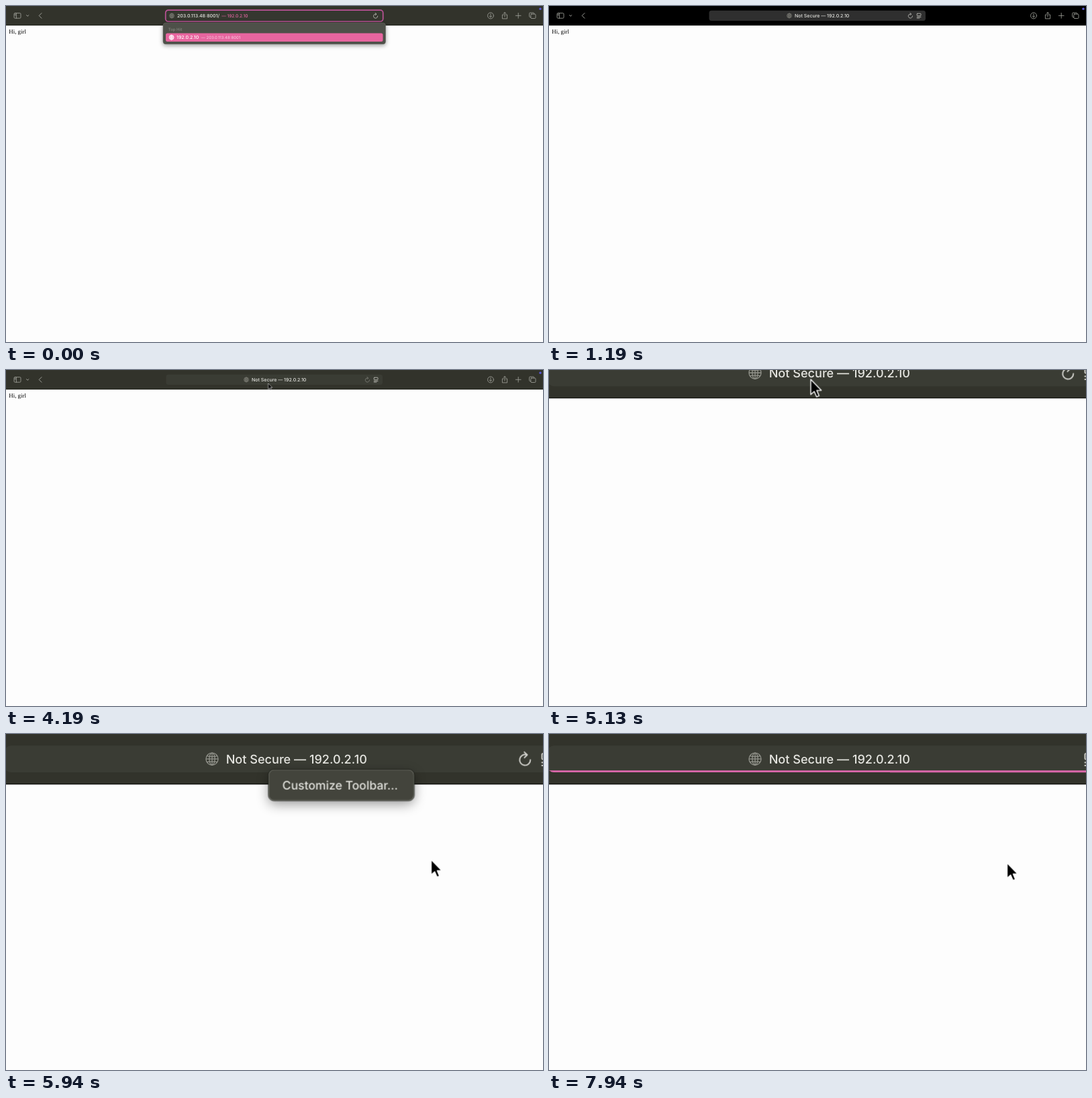
Animation of 800 by 500 pixels, one loop 8000 ms. Source, as an HTML page:

```html
<!DOCTYPE html>
<html lang="en">
<head>
<meta charset="utf-8">
<title>Browser toolbar</title>
<style>
@property --zoom { syntax: "<number>"; inherits: false; initial-value: 1; }
@property --focus { syntax: "<number>"; inherits: false; initial-value: 20.8; }
@property --x { syntax: "<length>"; inherits: false; initial-value: 396px; }
@property --y { syntax: "<length>"; inherits: false; initial-value: 26px; }

html, body { margin: 0; width: 100%; height: 100%; overflow: hidden; background: #fdfdfd; }
svg { display: block; }
text { font: 500 7px Inter, "Open Sans", sans-serif; fill: #e6e6e1; text-rendering: geometricPrecision; white-space: pre; }
.page { font: 8.9px "Liberation Serif", serif; fill: #000; }
.line { fill: none; stroke: #a0a19a; stroke-width: .85; stroke-linecap: round; stroke-linejoin: round; }
.bright { stroke: #d2d2cd; stroke-width: .75; }
.globe { fill: none; stroke: #92938b; stroke-width: .5; }

/* every track shares one 8 s clock */
.cam, .bar, .field, .focus, .list, .loading, .secure, .reader, .reload,
.stop, .share, .load, .menu, .hover, .cursor { animation: 8s linear infinite; }

.cam {
  animation-name: cam;
  transform: translate(calc((1 - var(--zoom)) * 390.2px), calc((1 - var(--zoom)) * var(--focus) * 1px)) scale(var(--zoom));
}
@keyframes cam {
  0%, 54.4% { --zoom: 1; --focus: 20.8; animation-timing-function: ease-in-out; }
  61% { --zoom: 2.584; --focus: 20.8; }
  64.3% { --zoom: 2.584; --focus: 20.8; animation-timing-function: ease-in-out; }
  69%, 100% { --zoom: 2.584; --focus: 0; }
}

.bar { animation-name: bar; }
@keyframes bar {
  0%, 11%, 43.5%, 100% { fill: #32332b; }
  14.1%, 38% { fill: #000; }
}
.field { animation-name: field; }
@keyframes field {
  0%, 11%, 43.5%, 100% { fill: #3a3c34; }
  14.1%, 38% { fill: #2f2f2f; }
}

.focus { animation-name: focus; animation-timing-function: step-end; }
@keyframes focus { 0% { opacity: 1; } 2%, 100% { opacity: 0; } }
.list { animation-name: list; }
@keyframes list { 0%, 1.5% { opacity: 1; } 4%, 100% { opacity: 0; } }

.loading { animation-name: loading; animation-timing-function: step-end; }
@keyframes loading {
  0%, 11%, 44%, 100% { opacity: 0; }
  2%, 25.75% { opacity: 1; }
}
.secure { animation-name: secure; animation-timing-function: step-end; }
@keyframes secure {
  0%, 25.75% { opacity: 0; }
  11%, 44%, 100% { opacity: 1; }
}
.reader { animation-name: reader; animation-timing-function: step-end; }
@keyframes reader { 0% { opacity: 0; } 2%, 100% { opacity: 1; } }
.reload { animation-name: reload; }
@keyframes reload {
  0%, 11%, 25.76%, 50.6%, 80.51%, 100% { opacity: 0; }
  13.5%, 25.75%, 54.2%, 80.5% { opacity: 1; }
}
.stop { animation-name: stop; animation-timing-function: step-end; }
@keyframes stop {
  0%, 10.2%, 44%, 98.4%, 100% { opacity: 0; }
  2%, 25.75%, 81.5% { opacity: 1; }
}
.share { animation-name: share; animation-timing-function: step-end; }
@keyframes share { 0%, 44%, 100% { opacity: 1; } 25.75% { opacity: .4; } }

.load { animation-name: load; }
@keyframes load {
  0%, 2% { width: 0; opacity: 1; fill: #ea6cb6; }
  8% { width: 322px; opacity: 1; }
  10.1% { width: 322px; opacity: 0; fill: #ea6cb6; }
  10.2%, 26% { width: 0; opacity: 1; fill: #d4d4d4; animation-timing-function: ease-out; }
  34.5%, 35.6% { width: 41px; }
  40% { width: 322px; opacity: 1; }
  44% { width: 322px; opacity: 0; fill: #d4d4d4; }
  44.1%, 90.6% { width: 0; opacity: 1; fill: #ea6cb6; }
  97.5%, 100% { width: 322px; opacity: 1; fill: #ea6cb6; }
}

.menu { animation-name: menu; }
@keyframes menu {
  0%, 68.99%, 82.5%, 100% { opacity: 0; }
  69%, 80.5% { opacity: 1; }
}
.hover { animation-name: hover; animation-timing-function: step-end; }
@keyframes hover { 0%, 74.2%, 100% { opacity: 0; } 70.8% { opacity: 1; } }

.cursor { animation-name: cursor; transform: translate(var(--x), var(--y)); }
@keyframes cursor {
  0%, 46.1% { --x: 396px; --y: 26px; opacity: 0; }
  46.2% { --x: 396px; --y: 26px; opacity: 1; }
  50%, 54.4% { --x: 390.6px; --y: 19.8px; }
  61%, 64.3% { --x: 390.1px; --y: 18.2px; }
  67%, 69.5% { --x: 390.2px; --y: 20.5px; }
  73.5% { --x: 456px; --y: 35.6px; }
  74.2%, 74.9% { --x: 484.3px; --y: 72.4px; }
  77.4%, 80.5% { --x: 494.6px; --y: 95.5px; animation-timing-function: ease-in-out; }
  85.1%, 100% { --x: 503.3px; --y: 74.3px; opacity: 1; }
}
</style>
</head>
<body>
<svg width="800" height="500" viewBox="0 0 800 500">
  <defs>
    <g id="globe">
      <circle r="3.5"/><ellipse rx="1.6" ry="3.5"/>
      <path d="M-3.5 0H3.5M0-3.5V3.5M-3-1.8Q0-1 3-1.8M-3 1.8Q0 1 3 1.8"/>
    </g>
    <g id="reload">
      <path d="M1-2.9A3.1 3.1 0 1 0 3.1 0M-.4-4.5L1.3-2.9L-.3-1.3"/>
    </g>
    <clipPath id="pill"><rect x="238.5" y="6.7" width="322.5" height="15.4" rx="3.5"/></clipPath>
  </defs>

  <g class="cam">
    <rect width="800" height="500" fill="#fdfdfd"/>
    <text class="page" x="4.3" y="41.3">Hi, girl</text>

    <rect class="bar" width="800" height="29"/>
    <rect y="28.6" width="800" height=".5" fill="#11120e"/>
    <rect class="field" x="238.5" y="6.7" width="322.5" height="15.4" rx="3.5"/>

    <g class="line">
      <rect x="12" y="10.6" width="10" height="7.6" rx="1.4"/>
      <path d="M15.4 10.6V18.2M13.2 12.5H14.2M13.2 14H14.2"/>
      <path d="M30.5 13.6L32.2 15.2L33.9 13.6" stroke-width="1"/>
      <path d="M53 10.6L49.2 14.4L53 18.2" stroke-width="1"/>
      <circle cx="722" cy="14.4" r="4.5"/>
      <path d="M722 11.8V16.6M720.2 15L722 16.8L723.8 15"/>
      <path class="share" d="M741.3 13H739.4V18.9H746.6V13H744.7M743 16V9.6M741.2 11.2L743 9.4L744.8 11.2"/>
      <path d="M759.3 14.3H767.1M763.2 10.4V18.2"/>
      <path d="M781.7 16.6H780.8Q779.6 16.6 779.6 15.4V11.3Q779.6 10.1 780.8 10.1H785.6Q786.8 10.1 786.8 11.3V12"/>
      <rect x="781.8" y="12" width="7.2" height="6.5" rx="1.2"/>
    </g>
    <circle cx="796" cy="4.3" r="1.7" fill="#5a58d6"/>

    <g class="loading">
      <use href="#globe" class="globe" x="382" y="14.4"/>
      <text x="390" y="17.2">192.0.2.10</text>
    </g>
    <g class="secure">
      <use href="#globe" class="globe" x="358" y="14.4"/>
      <text x="366" y="17.2">Not Secure — 192.0.2.10</text>
    </g>
    <g class="line bright">
      <g class="reload"><use href="#reload" x="538.4" y="14.9"/></g>
      <path class="stop" d="M535.8 12L541.2 17.4M541.2 12L535.8 17.4"/>
      <path class="reader" d="M548.9 11.2H553.3Q554 11.2 554 11.9V13.9Q554 14.6 553.3 14.6H548.9Q548.2 14.6 548.2 13.9V11.9Q548.2 11.2 548.9 11.2M548.2 16.4H554M548.2 18.1H552"/>
    </g>
    <g clip-path="url(#pill)"><rect class="load" x="238.5" y="21.1" width="0" height="1"/></g>

    <g class="focus">
      <rect x="237.7" y="6.2" width="324" height="16.8" rx="4" fill="#35372f" stroke="#bb5296" stroke-width="1.7"/>
      <use href="#globe" class="globe" x="247" y="14.5"/>
      <text x="255" y="17.2">203.0.113.48:8001/</text>
      <text x="321.3" y="17.2" style="font-size:6.5px;fill:#e0679f">— 192.0.2.10</text>
      <use href="#reload" class="line bright" x="550.6" y="15"/>
    </g>
    <g class="list" style="filter:drop-shadow(0 2px 3px #0006)">
      <rect x="234" y="25" width="331.5" height="31.7" rx="4" fill="#4e5049" stroke="#65675f" stroke-width=".5"/>
      <text x="241.7" y="36.8" style="font-size:6px;font-weight:600;fill:#7f8179">Top Hit</text>
      <rect x="238" y="40.6" width="323.5" height="12.3" rx="2.5" fill="#e7659f"/>
      <use href="#globe" class="globe" x="246.6" y="46.7" style="stroke:#fff;stroke-width:.8"/>
      <text x="254" y="49.3" style="fill:#fff">192.0.2.10</text>
      <text x="290.8" y="49.1" style="font-size:6px;font-weight:400;fill:#f8cfe2">— 203.0.113.48:8001</text>
    </g>

    <g class="menu">
      <rect x="390.7" y="20.7" width="83.6" height="17.5" rx="3" fill="#43443c" stroke="#74766d" stroke-width=".4"
        style="filter:drop-shadow(0 2.5px 3.5px #0006)"/>
      <rect x="390.4" y="20.4" width="84.2" height="18.1" rx="3.2" fill="none" stroke="#1b1c17" stroke-width=".3"/>
      <rect class="hover" x="393.2" y="23.2" width="78.6" height="12.6" rx="1.8" fill="#e7659f"/>
      <text x="398.5" y="32.1" style="font-size:6.8px">Customize Toolbar…</text>
    </g>

    <path class="cursor" d="M0 0V8.7L2 6.9L3.4 10L4.8 9.4L3.5 6.3H6.1Z" fill="#000" stroke="#fff" stroke-width=".55" stroke-linejoin="round"/>
  </g>
</svg>
</body>
</html>
```
